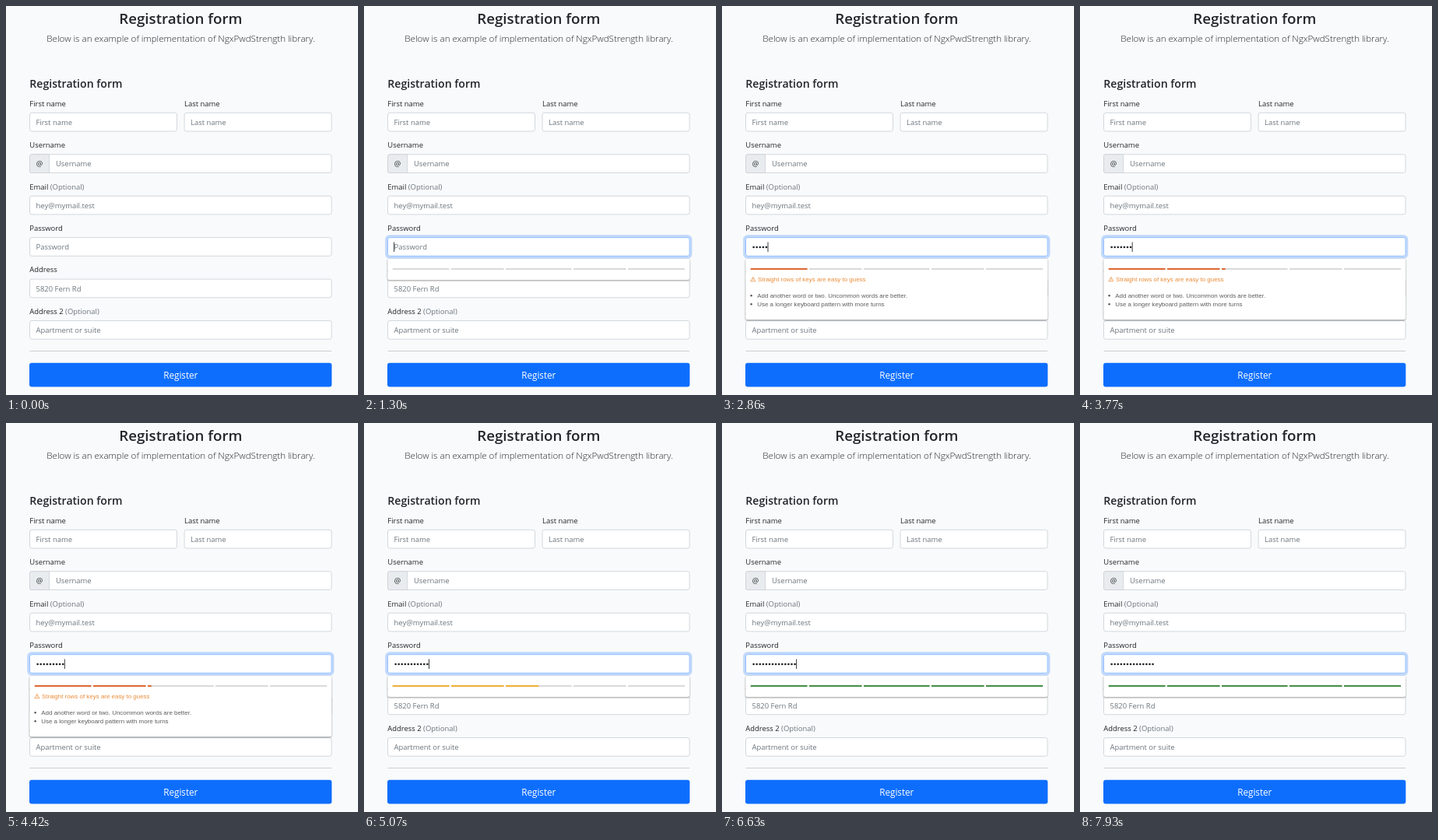
An HTML page for the animation above (8.19 s loop, 452x500 px).

```html
<!DOCTYPE html>
<html lang="en">
<head>
<meta charset="utf-8">
<title>Registration form</title>
<style>
  html, body { margin: 0; width: 100%; height: 100%; overflow: hidden; background: #f9fafb; }
  svg { display: block; width: 452px; height: 500px; }
  text { font: 9.45px "Open Sans", "Noto Sans", sans-serif; fill: #212529; white-space: pre; }
  .title { font-size: 18.7px; font-weight: 600; text-anchor: middle; }
  .lead { font-size: 11.59px; font-weight: 300; text-anchor: middle; }
  .section { font-size: 14.1px; font-weight: 600; }
  .muted { fill: #6c757d; }
  .mid { text-anchor: middle; }
  .button { font-size: 11.7px; fill: #fff; text-anchor: middle; }
  .field { fill: #fff; stroke: #ced4da; stroke-width: 0.9; }
  .card { fill: #fff; filter: drop-shadow(0 1px 0.8px rgba(0,0,0,.36)) drop-shadow(0 0 0.6px rgba(0,0,0,.16)); }
  .tip { font: 7.95px "Liberation Sans", Arial, sans-serif; fill: #5c5c5c; }
  .warn { fill: #e98a35; }
</style>
</head>
<body>
<svg id="stage" viewBox="0 0 452 500"></svg>
<script>
const LOOP = 8190, STEP = 130, BLINK = 520, FILL_TIME = 260, FOCUS = 1040;
const KEYS = [1560, 1820, 2210, 2600, 2860, 3380, 3770,
              4160, 4420, 4810, 4940, 5460, 5980, 6370];
const GREEN = '#478f48';
const CARD_TOP = 324.7;
// start, filled share, colour, card bottom
const STATES = [
  [0, 0, GREEN, 352],
  [1560, .2, '#6c3038', 372.6],
  [2860, .4, '#dd6a36', 403],
  [4940, .6, '#efb13c', 352],
  [5980, .8, GREEN, 352],
  [6370, 1, GREEN, 352]
];
const SEGMENTS = [[36.5, 109.5], [112, 179.5], [182, 266.5], [269, 336.5], [339, 412]];
const BAR = { x: 36.5, y: 336.8, w: 375.5, h: 2.5 };
const DOT_X = 38.6, DOT_STEP = 4.07;
const stage = document.getElementById('stage');

function add(tag, attrs, parent = stage, content = '') {
  const node = document.createElementNS('http://www.w3.org/2000/svg', tag);
  for (const key in attrs) node.setAttribute(key, attrs[key]);
  node.textContent = content;
  parent.append(node);
  return node;
}
const set = (node, key, value) => node.setAttribute(key, value);
const show = (node, on) => set(node, 'visibility', on ? 'visible' : 'hidden');
const clamp = v => Math.max(0, Math.min(1, v));
const text = (x, y, str, cls = '', parent = stage) => add('text', { x, y, class: cls }, parent, str);
const rowY = row => 137.3 + row * 53.45;

function field(row, x, w, hint, hintX = x + 8) {
  const y = rowY(row);
  const box = add('rect', { x, y, width: w, height: 23.7, rx: 2.6, class: 'field' });
  return { box, hint: text(hintX, y + 15.4, hint, 'muted') };
}
function label(row, x, str, note) {
  const node = text(x, rowY(row) - 8.7, str);
  if (note) add('tspan', { class: 'muted' }, node, ' ' + note);
}

// Static form
text(224.3, 22.6, 'Registration form', 'title');
text(224.5, 45.8, 'Below is an example of implementation of NgxPwdStrength library.', 'lead');
text(30.3, 105, 'Registration form', 'section');

label(0, 30.3, 'First name');
label(0, 229, 'Last name');
label(1, 30.3, 'Username');
label(2, 30.3, 'Email', '(Optional)');
label(3, 30.3, 'Password');
label(4, 30.3, 'Address');
label(5, 30.3, 'Address 2', '(Optional)');

field(0, 30.5, 189, 'First name');
field(0, 229, 189, 'Last name');
field(1, 30.5, 387.5, 'Username', 64);
add('path', { d: 'M55.5 190.8H33a2.5 2.5 0 0 0-2.5 2.5v18.7a2.5 2.5 0 0 0 2.5 2.5H55.5z',
  fill: '#e9ecef', stroke: '#ced4da', 'stroke-width': .9 });
text(43, 206, '@', 'mid');
field(2, 30.5, 387.5, 'hey@mymail.test');
field(4, 30.5, 387.5, '5820 Fern Rd');
field(5, 30.5, 387.5, 'Apartment or suite');
add('rect', { x: 30.5, y: 443, width: 387.5, height: 1, fill: '#cbcdcf' });
add('rect', { x: 30, y: 458.8, width: 388.3, height: 30.6, rx: 3, fill: '#0d6efd' });
text(224.3, 478.6, 'Register', 'button');

// Password field
const ring = add('rect', { x: 28.7, y: rowY(3) - 1.8, width: 391.1, height: 27.3, rx: 4,
  fill: 'none', stroke: '#c0d8fc', 'stroke-width': 3 });
const password = field(3, 30.5, 387.5, 'Password');
const dots = KEYS.map((_, i) =>
  add('circle', { cx: DOT_X + (i + .5) * DOT_STEP, cy: 310, r: 1.35, fill: '#212529' }));
const caret = add('rect', { y: 303.5, width: .9, height: 12.5, fill: '#212529' });

// Strength card
const panel = add('g', {});
const card = add('rect', { x: 30.3, y: CARD_TOP, width: 387.7, rx: 2, class: 'card' }, panel);
const clip = add('clipPath', { id: 'segments' }, panel);
for (const [a, b] of SEGMENTS) add('rect', { x: a, y: BAR.y, width: b - a, height: BAR.h }, clip);
const bar = add('g', { 'clip-path': 'url(#segments)' }, panel);
add('rect', { x: BAR.x, y: BAR.y, width: BAR.w, height: BAR.h, fill: '#dadada' }, bar);
const fill = add('rect', { x: BAR.x, y: BAR.y, height: BAR.h }, bar);

function tip(y, str, parent) {
  add('circle', { cx: 37.6, cy: y - 2.5, r: 1.2, fill: '#555' }, parent);
  text(45.3, y, str, 'tip', parent);
}
const ADVICE = 'Add another word or two. Uncommon words are better.';
const shortTips = add('g', {}, panel);
tip(353, ADVICE, shortTips);
const longTips = add('g', {}, panel);
add('path', { d: 'M39.9 348.3L43 353.8H36.8zM39.9 350.2v1.7M39.9 352.5v.6',
  fill: 'none', stroke: '#e98a35', 'stroke-width': .7 }, longTips);
text(46, 354, 'Straight rows of keys are easy to guess', 'tip warn', longTips);
tip(374.8, ADVICE, longTips);
tip(385.7, 'Use a longer keyboard pattern with more turns', longTips);

function render(time) {
  const t = Math.floor((time % LOOP) / STEP) * STEP;
  const typed = KEYS.filter(k => k <= t).length;
  const focus = clamp((t - FOCUS + STEP) / (3 * STEP));
  const focused = t >= FOCUS;

  set(ring, 'opacity', focus);
  password.box.style.stroke = focused ? '#86b7fe' : '#ced4da';
  show(password.hint, !typed);
  dots.forEach((dot, i) => show(dot, i < typed));

  const last = typed ? KEYS[typed - 1] : FOCUS;
  set(caret, 'x', DOT_X - .4 + typed * DOT_STEP);
  show(caret, focused && Math.floor((t - last) / BLINK) % 2 === 0);

  const n = STATES.filter(s => s[0] <= t).length - 1;
  const [start, share, color, bottom] = STATES[n];
  const from = n ? STATES[n - 1][1] : 0;
  const level = from + (share - from) * clamp((t - start) / FILL_TIME);
  set(panel, 'opacity', focus);
  set(card, 'height', bottom - CARD_TOP);
  set(fill, 'width', BAR.w * level);
  set(fill, 'fill', color);
  show(shortTips, n === 1);
  show(longTips, n === 2);
}

const begin = performance.now();
function tick() {
  render(performance.now() - begin);
  requestAnimationFrame(tick);
}
tick();
</script>
</body>
</html>
```
